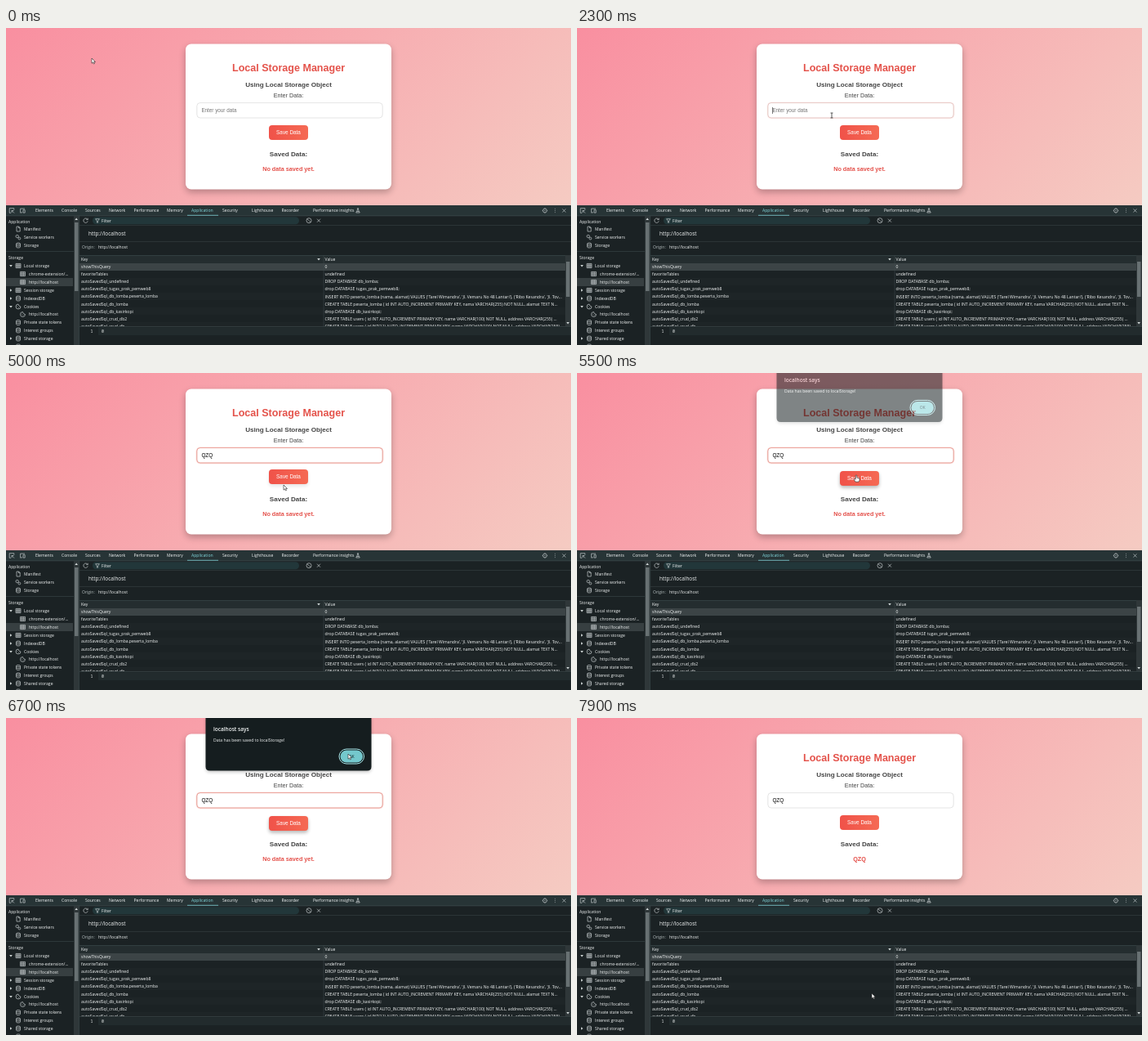
Animation, 692 px wide and 388 px high, one loop 8000 ms. Source, as an HTML page:

```html
<!DOCTYPE html>
<html lang="en">
<head>
<meta charset="utf-8">
<title>Local Storage Manager</title>
<style>
  html, body { margin: 0; height: 100%; overflow: hidden; }
  svg { display: block; width: 692px; height: 388px; }
  text { white-space: pre; }
  .page { font-family: "Liberation Sans", Arial, sans-serif; }
  .tools { font-family: "Open Sans", "Noto Sans", sans-serif; fill: #f2f5f5; }
  .mono { font-family: "Noto Sans Mono", monospace; }
  .mid { text-anchor: middle; }
  .bold { font-weight: bold; }
  .icon { fill: none; stroke: #ccd3d4; stroke-width: .65; }
</style>
</head>
<body>
<svg viewBox="0 0 692 388">
  <defs>
    <linearGradient id="sky" gradientUnits="userSpaceOnUse" x1="118.75" y1="-118.75" x2="573.25" y2="335.75">
      <stop stop-color="#f98fa0"/><stop offset="1" stop-color="#f5cbc2"/>
    </linearGradient>
    <linearGradient id="coral"><stop stop-color="#f05249"/><stop offset="1" stop-color="#f56a54"/></linearGradient>
    <filter id="soft" x="-20%" y="-20%" width="140%" height="150%"><feGaussianBlur stdDeviation="4"/></filter>
    <filter id="near" x="-20%" y="-50%" width="140%" height="220%"><feGaussianBlur stdDeviation="2"/></filter>
    <clipPath id="rows"><path d="M90 288H685V365H90Z"/></clipPath>
  </defs>

  <g class="page">
    <path fill="url(#sky)" d="M0 0H692V217H0Z"/>
    <rect x="220" y="23" width="252" height="178" rx="7" opacity=".26" filter="url(#soft)"/>
    <rect x="220" y="19.5" width="252" height="178" rx="7" fill="#fff"/>
    <g class="mid">
      <text class="bold" x="346" y="52.6" font-size="12.55" fill="#e4524a">Local Storage Manager</text>
      <text class="bold" x="346" y="72" font-size="8.1" fill="#444">Using Local Storage Object</text>
      <text x="346" y="85" font-size="7.2" fill="#444">Enter Data:</text>
      <text class="bold" x="346" y="157.2" font-size="8.1" fill="#444">Saved Data:</text>
      <text class="bold" id="saved" x="346" y="175" font-size="7.25" fill="#e4504a"></text>
    </g>
    <rect x="233.8" y="91.6" width="227.4" height="18.4" rx="4" fill="#fff" stroke="#ddd" stroke-width=".8"/>
    <g id="glow" fill="none" stroke="#f0786c">
      <rect x="233.4" y="91.2" width="228.2" height="19.2" rx="4.4" stroke-width="1.6" opacity=".25"/>
      <rect x="233.8" y="91.6" width="227.4" height="18.4" rx="4" stroke-width=".8" opacity=".6"/>
    </g>
    <text id="entry" x="239.4" y="103" font-size="6.4"></text>
    <path id="caret" stroke="#222" stroke-width=".6"/>
    <g id="button">
      <rect id="lift" x="322" y="121.5" width="48" height="18" rx="4" filter="url(#near)"/>
      <rect x="322" y="119" width="48" height="18" rx="4" fill="url(#coral)"/>
      <text class="mid" x="346" y="130.4" font-size="6.4" fill="#fff">Save Data</text>
    </g>
  </g>

  <g id="dialog" class="tools">
    <path d="M245 0H447V62Q447 66 442 66H250Q245 66 245 62Z" fill="#000" opacity=".25" filter="url(#near)"/>
    <path d="M244.5 -6H447.5V59.5Q447.5 64.5 442.5 64.5H249.5Q244.5 64.5 244.5 59.5Z" fill="#151d1f"/>
    <text x="254" y="15.6" font-size="6.5" font-weight="600">localhost says</text>
    <text x="254" y="28.8" font-size="5.1">Data has been saved to localStorage!</text>
    <rect x="408" y="38" width="30.5" height="18" rx="9" fill="none" stroke="#a9e9ec"/>
    <rect id="ok" x="409.5" y="39.5" width="27.5" height="15" rx="7.5"/>
    <text class="mid" x="423.2" y="48.9" font-size="5.1" style="fill:#143538">OK</text>
  </g>

  <g id="tools" class="tools"></g>

  <g id="mouse">
    <path id="arrow" d="M0 0V6.2L1.5 4.9L2.5 7L3.5 6.5L2.6 4.5H4.5Z" fill="#fff" stroke="#222" stroke-width=".6"/>
    <path id="beam" d="M-1.5 -3H1.5M0 -3V3M-1.5 3H1.5" fill="none" stroke="#333" stroke-width=".8"/>
    <path id="hand" d="M-.8 -.6Q0 -1.6 .8 -.6V2.2L4 3V5.4L3 7.2H-1L-2.9 4.2L-2 3.4L-.8 4.3Z" fill="#fff" stroke="#222" stroke-width=".6"/>
  </g>
</svg>
<script>
const $ = id => document.getElementById(id);
const word = "QZQ";

// Developer tools panel
const text = (x, y, s, size = 5.05, more = "") =>
  `<text x="${x}" y="${y + size * .36}" font-size="${size}" ${more}>${s}</text>`;
const box = (x, y, w, h, fill, rx = 0) =>
  `<rect x="${x}" y="${y}" width="${w}" height="${h}" fill="${fill}" rx="${rx}"/>`;
const shapes = {
  table: "M-3 -2.6H3V2.6H-3ZM-3 -.8H3M-3 .9H3M-1 -2.6V2.6M1 -2.6V2.6",
  store: "M-2.5 -2A2.5 1 0 0 1 2.5 -2V2A2.5 1 0 0 1 -2.5 2ZM-2.5 -2A2.5 1 0 0 0 2.5 -2M-2.5 0A2.5 1 0 0 0 2.5 0",
  cookie: "M0 -3A3 3 0 1 0 3 0Q1 0 1 -1.5Q0 -1.5 0 -3M-1.2 -.6V.2M.4 1V1.8",
  page: "M-2 -3H.7L2.2 -1.5V3H-2ZM.5 -3V-1.3H2.2",
  gears: "M-3 -1A1.7 1.7 0 1 1 .4 -1A1.7 1.7 0 1 1 -3 -1M0 1.6A1.4 1.4 0 1 1 2.8 1.6A1.4 1.4 0 1 1 0 1.6",
  inspect: "M2.8 -.8V-2.8H-2.8V2.8H-.8M0 0L3 3M0 2.4V0H2.4",
  device: "M-3 2.4H0M-2.4 2V-2.4H3M1 -.8H3.2V2.6H1Z",
  reload: "M2.4 -1.4A2.7 2.7 0 1 0 2.7 .7M2.7 -3V-1.1H.8",
  funnel: "M-2.4 -2H2.4L.6 .4V2.4H-.6V.4Z",
  block: "M-3 0A3 3 0 1 1 3 0A3 3 0 1 1 -3 0M-2.1 -2.1L2.1 2.1",
  cross: "M-2 -2L2 2M2 -2L-2 2",
  gear: "M-2.4 0A2.4 2.4 0 1 1 2.4 0A2.4 2.4 0 1 1 -2.4 0M-.7 0H.7M0 -3.2V-2.4M0 2.4V3.2M-3.2 0H-2.4M2.4 0H3.2",
  dots: "M0 -2.6V-1.8M0 -.4V.4M0 1.8V2.6",
  flask: "M-1 -2.6H1M-.6 -2.6V-.6L-2.3 2.5H2.3L.6 -.6V-2.6M-1.2 1H1.2",
};
const icon = (name, x, y) => `<path class="icon" d="${shapes[name]}" transform="translate(${x} ${y})"/>`;
const wedge = (x, y, turn = 0) =>
  `<path d="M-1.8 -1H1.8L0 1.4Z" fill="#d0d7d7" transform="translate(${x} ${y}) rotate(${turn})"/>`;

const tabs = [["Elements", 36], ["Console", 68], ["Sources", 97], ["Network", 126], ["Performance", 156.5],
  ["Memory", 197], ["Application", 227], ["Security", 265], ["Lighthouse", 301], ["Recorder", 337.5],
  ["Performance insights", 376]];

// label, y, icon, depth, wedge angle
const tree = [["Manifest", 246, "page", 0], ["Service workers", 256, "gears", 0], ["Storage", 266, "store", 0],
  ["Local storage", 291, "table", 0, 0], ["chrome-extension/...", 301, "table", 1], ["http://localhost", 311, "table", 1],
  ["Session storage", 321, "table", 0, -90], ["IndexedDB", 331, "store", 0, -90], ["Cookies", 341, "cookie", 0, 0],
  ["http://localhost", 350.5, "cookie", 1], ["Private state tokens", 360.5, "store", 0],
  ["Interest groups", 370, "store", 0], ["Shared storage", 380, "store", 0, -90], ["Cache storage", 390, "store", 0]];

const users = "CREATE TABLE users ( id INT AUTO_INCREMENT PRIMARY KEY, name VARCHAR(100) NOT NULL, address VARCHAR(255) ...";
const entries = [["showThisQuery", "0"], ["favoriteTables", "undefined"],
  ["autoSavedSql_undefined", "DROP DATABASE db_lomba;"],
  ["autoSavedSql_tugas_prak_pemweb8", "drop DATABASE tugas_prak_pemweb8;"],
  ["autoSavedSql_db_lomba.peserta_lomba", "INSERT INTO peserta_lomba (nama, alamat) VALUES ('Tarel Wimandra', 'Jl. Vemaru No 48 Lantari'), ('Ribo Kesandra', 'Jl. Tov..."],
  ["autoSavedSql_db_lomba", "CREATE TABLE peserta_lomba ( id INT AUTO_INCREMENT PRIMARY KEY, nama VARCHAR(255) NOT NULL, alamat TEXT N..."],
  ["autoSavedSql_db_kasirkopi", "drop DATABASE db_kasirkopi;"],
  ["autoSavedSql_crud_db2", users], ["autoSavedSql_crud_db", users.replace("INT", "INT(11)")]];

$("tools").innerHTML =
  box(0, 217, 692, 171, "#1b2224") + box(0, 217, 692, 13, "#273436") +
  box(0, 229.6, 692, .6, "#414e50") + box(222, 228.8, 38, .9, "#73bfc4") +
  tabs.map(([s, x]) => text(x, 223.5, s, 5.1, s == "Application" ? 'style="fill:#83d9de"' : "")).join("") +
  icon("inspect", 7, 223.5) + icon("device", 20, 223.5) + icon("flask", 431, 223.5) +
  icon("gear", 660, 223.5) + icon("dots", 672.5, 223.5) + icon("cross", 683.5, 223.5) +
  // sidebar
  text(3, 237, "Application") + text(3, 281.5, "Storage") +
  box(0, 273.4, 83, .5, "#414e50") + box(0, 306, 82, 10, "#373f41") +
  tree.map(([s, y, name, depth, turn]) => icon(name, 15 + depth * 5.5, y) + text(22 + depth * 6, y, s) +
    (turn == null ? "" : wedge(6, y, turn))).join("") +
  box(83, 230, 6.5, 158, "#2f3739") + wedge(86.2, 234, 180) + box(84, 238, 4.5, 84, "#687173") +
  // toolbar and heading
  box(89.5, 230, .6, 158, "#414e50") + box(106, 231.2, 253, 9, "#22373a", 4.5) +
  icon("reload", 97.5, 235.7) + icon("funnel", 112, 235.7) + text(117, 235.7, "Filter") +
  icon("block", 371, 235.7) + icon("cross", 383, 235.7) + box(90, 241.2, 602, .5, "#3b4749") +
  text(101, 252, "http://localhost", 6.4) + box(90, 261.5, 602, .5, "#3b4749") +
  text(93, 268, "Origin:", 5.05, 'style="fill:#b6bfc0"') + text(113, 268, "http://localhost") +
  // table
  box(90, 278, 602, 10, "#242d2f") + box(90, 278, 602, .5, "#414e50") +
  text(92, 283, "Key") + wedge(383, 283) + text(390.5, 283, "Value") +
  `<g clip-path="url(#rows)">` + box(90, 288, 595, 9, "#3c4446") +
  entries.map(([key, value], i) => (i % 2 || !i ? "" : box(90, 288 + i * 9, 595, 9, "#1e2527")) +
    text(92, 292.6 + i * 9.02, key) + text(390.5, 292.6 + i * 9.02, value, 5.1)).join("") + "</g>" +
  box(388.8, 278, .5, 87, "#414e50") + box(685, 278, 7, 87, "#2f3739") +
  box(686, 286, 4.5, 43, "#687173") + wedge(688.2, 361) +
  // value preview
  box(90, 365, 602, 23, "#1b2224") + box(90, 365, 602, .6, "#414e50") + box(113, 366.3, 579, 9.7, "#222b2d") +
  text(103.5, 371, "1", 4.9, 'class="mono"') + text(117, 371, "0", 4.9, 'class="mono"');

// Pointer stops: time, x, y
const stops = [[0, 105, 37], [400, 582, 91], [1000, 582, 91], [1100, 485, 139], [1200, 485, 139], [2100, 312, 107],
  [4500, 312, 107], [5000, 340, 137], [5400, 342, 126], [5700, 342, 126], [6300, 417, 43], [6600, 417, 43],
  [6700, 419, 44], [6800, 419, 44], [7000, 440.5, 166], [7500, 394, 321], [7600, 394, 321], [7700, 383, 292], [7900, 361, 337]];

const clamp = v => Math.max(0, Math.min(1, v));
const show = (id, on) => $(id).style.display = on ? "" : "none";

function pointer(t) {
  const i = Math.max(1, stops.findIndex(s => s[0] >= t));
  const [t0, x0, y0] = stops[i - 1], [t1, x1, y1] = stops[i];
  const k = (t - t0) / (t1 - t0);
  return [x0 + (x1 - x0) * k, y0 + (y1 - y0) * k];
}

function draw(t) {
  const within = (a, b) => t >= a && t < b;

  const typed = word.slice(0, (t >= 3700) + (t >= 3900) + (t >= 4000));
  $("entry").textContent = typed || "Enter your data";
  $("entry").setAttribute("fill", typed ? "#000" : "#757575");
  $("entry").setAttribute("font-size", typed ? 6.4 : 6.3);
  $("saved").textContent = t < 6900 ? "No data saved yet." : word;
  $("glow").style.opacity = clamp((t - 2150) / 350) * clamp((7020 - t) / 120);

  show("caret", within(2200, 2800) || within(3400, 4600) || within(5100, 5400));
  const caretX = 239.5 + [0, 5, 9, 14][typed.length];
  $("caret").setAttribute("d", `M${caretX} 97V105`);

  const pressed = within(5400, 6900), hover = within(4800, 5400);
  $("button").setAttribute("transform", `translate(0 ${pressed ? 1 : hover ? -1 : 0})`);
  $("lift").style.opacity = pressed ? .28 : hover ? .1 : 0;

  show("dialog", within(5500, 6900));
  const open = clamp((t - 5365) / 250);
  $("dialog").style.opacity = open;
  $("dialog").setAttribute("transform", `translate(0 ${-10 * (1 - open)})`);
  $("ok").setAttribute("fill", t < 6400 ? "#82d3d8" : "#74c8cd");

  const [x, y] = pointer(t);
  const beam = within(2000, 4700), hand = within(5100, 5800);
  $("mouse").setAttribute("transform", `translate(${x} ${y})`);
  show("beam", beam);
  show("hand", hand);
  show("arrow", !beam && !hand);
}

function frame(now) {
  draw(Math.floor(now % 8000 / 100) * 100);
  requestAnimationFrame(frame);
}
frame(performance.now());
</script>
</body>
</html>
```
